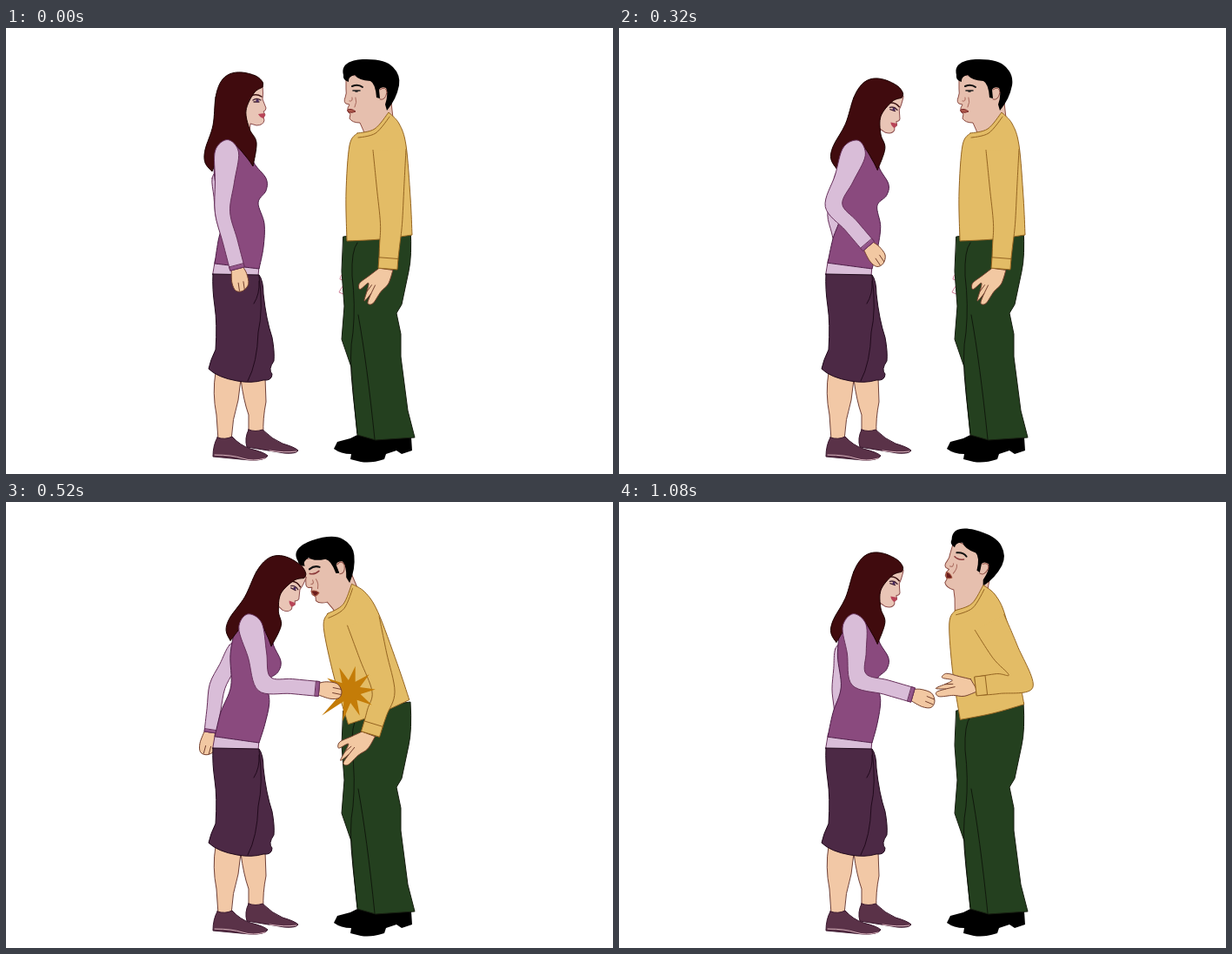
Write an HTML page that moves like this. It is 698 px wide and 513 px high and loops after 1.2 s.

```html
<!DOCTYPE html>
<html lang="en">
<head>
<meta charset="utf-8">
<style>
html, body { margin: 0; width: 100%; height: 100%; overflow: hidden; background: #fff; }
svg { display: block; width: 100vw; height: 100vh; }
path { stroke-linejoin: round; stroke-linecap: round; }
</style>
</head>
<body>
<svg viewBox="0 0 698 513" fill="none">
  <path fill="#000" d="M377,484L381,476 396,472 404,468 466,471 467,486 455,490 449,486 437,490 435,496Q420,501 408,499L396,496 397,490Q385,490 377,484Z"/>
  <path id="fingertips" stroke="#d08098" d="M388,282Q384,285 384,289L388,290M388,296Q384,301 383,304L388,306"/>
  <path fill="#24401f" stroke="#161d10" d="M388,240L465,230Q467,262 463,280L455,318 449,328 454,352 454,378 462,440 470,471 425,474 404,468Q400,430 397,390L386,358 389,320 386,280Z"/>
  <path stroke="#10180c" d="M404,247Q397,256 398,285 402,318 399,350 394,375 399,420L404,466M405,330Q415,385 424,473"/>
  <g id="manHead">
    <path fill="#e6bfae" stroke="#8c4c43" d="M391,54L391,70Q392,75 390,80 388,85 391,87L395,88 393,92 393,96 396,99 395,104Q398,109 407,109L411,118 416,134 446,112 440,60Z"/>
    <path fill="#000" d="M388,54C385,42 395,37 410,36Q436,35 445,45 454,54 452,66 449,82 438,95L436,88Q440,76 437,69 431,67 429,71L430,81 426,80Q425,64 419,61 405,60 401,54 393,56 394,62 387,60 388,54Z"/>
    <path fill="#e6bfae" stroke="#8c4c43" d="M430,71Q437,66 438,74 436,84 430,82"/>
    <path stroke="#a8685c" d="M402,80Q404,85 401,91M395,84Q399,85 398,80"/>
    <path stroke="#111" stroke-width="2" d="M398,67Q405,64 410,68"/>
    <path id="openEye" stroke="#222" stroke-width="1.6" d="M399,72L407,72M402,73L404,73"/>
    <path id="shutEye" stroke="#8c3b3b" stroke-width="1.6" d="M397,72Q402,75 408,72"/>
    <path id="calmMouth" fill="#b05a4c" stroke="#7a2828" d="M393,94Q397,92 402,96 398,98 394,97Z"/>
    <path id="openMouth" fill="#6a1c1c" stroke="#a0503c" d="M393,92Q397,91 401,96 397,99 395,98Z"/>
  </g>
  <g id="man"></g>
  <path id="star" fill="#c47c08"/>
  <g id="farArm"></g>
  <g stroke="#6e4038">
    <path fill="#f2c8a6" d="M241,396Q237,420 242,445L244,474H259Q260,450 267,428L270,404ZM270,404Q273,428 279,445L279,467H296Q295,450 299,430L298,402Z"/>
    <g fill="#5a3248" stroke="#38162c">
      <path d="M279,462Q287,465 295,462 306,473 318,478 332,482 336,486 334,490 320,489L277,482Q274,472 279,462Z"/>
      <path d="M243,471Q252,474 260,470 269,480 281,484 297,488 301,492 298,498 280,497L238,493Q238,480 243,471Z"/>
      <path stroke="#d9b4bd" d="M240,491Q260,491 272,495T298,495M303,486Q320,489 334,487"/>
    </g>
    <path fill="#d9bdd8" stroke="#66305a" d="M241,266L291,274 290,285 238,284Z"/>
    <path fill="#4c2945" stroke="#210a1c" d="M238,283L291,284Q296,291 296,306 299,335 306,356 309,372 308,383 301,393 306,398 306,406 296,405 283,409 266,406 243,402 233,392 235,382 241,370 243,340 240,320 237,300 238,283Z"/>
    <path stroke="#210a1c" d="M291,285Q296,325 290,350 289,385 278,406M291,291Q292,306 285,317"/>
  </g>
  <g id="womanHead">
    <path fill="#e9c5b6" stroke="#8c4c4c" d="M277,68L295,66Q296,76 295,82L299,92Q299,95 296,96L298,100 296,103 297,106Q296,112 288,112L281,110 279,130 264,130 274,90Z"/>
    <path stroke="#3a1010" stroke-width="1.5" d="M282,78Q288,75 294,79"/>
    <path stroke="#402030" stroke-width="1.3" d="M284,83Q288,80 293,83M285,85L291,85"/>
    <circle cx="289" cy="83.5" r="1.6" fill="#4a2a60"/>
    <path fill="#b84458" d="M290,99L297,98 298,100 296,104Q292,103 290,99Z"/>
  </g>
  <g id="woman"></g>
</svg>
<script>
const $ = id => document.getElementById(id);
const parse = text => text.split(' ').map(pair => pair.split(',').map(Number));
const mix = (a, b, k) => a + (b - a) * k;
const middle = (a, b) => [mix(a[0], b[0], .5), mix(a[1], b[1], .5)];
const unit = ([x, y]) => [x / Math.hypot(x, y), y / Math.hypot(x, y)];
const toward = (a, b) => unit([b[0] - a[0], b[1] - a[1]]);
// Point reached by going along direction d and sideways from it.
const step = (p, d, along, side) => [p[0] + d[0] * along - d[1] * side, p[1] + d[1] * along + d[0] * side];

// How each upper body bends above the waist as the figure leans.
const woman = {
  axis: 270, waist: 272, height: 150, power: 1.4, sag: .19,
  head: [288, 83], shoulder: [254, 142], farShoulder: [246, 172], arm: [13.5, 8.5, 8.5],
  torso: parse('254,118 275,130 285,155 299,173 299,187 290,201 297,225 296,252 291,277 240,271 244,245 250,215 241,180 239,150 243,132'),
  hair: parse('241,80 247,62 257,53 271,51 287,55 295,62 295,68 285,75 276,95 280,116 288,132 284,159 276,148 262,134 248,140 237,165 229,155 229,140 238,112')
};
const man = {
  axis: 430, waist: 244, height: 140, power: 1, sag: 0,
  head: [432, 100], shoulder: [441, 140], arm: [19, 12.5, 10.5],
  torso: parse('404,121 424,116 440,97 452,110 460,135 465,195 467,238 430,243 392,245 391,190 395,135')
};

// Local hand outlines: x runs on from the wrist.
const fist = parse('0,-7 8,-9 20,-8 26,0 24,8 14,10 0,7');
const fistLines = ['16,-3 25,-2', '16,3 25,4'].map(parse);
const openHand = parse('0,10 1,-6 17,-2 27,6 41,14 41,20 30,17 39,24 28,22 18,21 26,30 19,31 9,20');
const openLines = ['20,13 30,17', '20,17 28,22'].map(parse);

const womanStand = { lean: 0, nod: 0, elbow: [249, 212], wrist: [266, 277], farElbow: [250, 215], farWrist: [258, 250] };
const womanLean = { lean: 20, nod: 6, elbow: [247, 204], wrist: [287, 251], farElbow: [249, 215], farWrist: [256, 254] };
const womanDraw = { lean: 32, nod: 9, elbow: [283, 203], wrist: [332, 231], farElbow: [243, 212], farWrist: [235, 265] };
const womanPunch = { ...womanDraw, elbow: [297, 209], wrist: [360, 215] };
const womanBack = { ...womanLean, elbow: [276, 204], wrist: [338, 222], farElbow: [254, 215] };
const womanKeys = [[0, womanStand], [240, womanStand], [320, womanLean], [400, womanDraw], [480, womanPunch], [520, womanPunch], [560, womanBack]];

const manStand = { lean: 0, nod: 0, twist: 0, elbow: [443, 225], wrist: [439, 277] };
const manLean = { lean: -25, nod: 0, twist: -10, elbow: [437, 220], wrist: [440, 275] };
const manHit = { lean: -40, nod: 0, twist: 0, elbow: [434, 218], wrist: [419, 267] };
const manBack = { lean: -20, nod: 25, twist: -28, elbow: [462, 206], wrist: [410, 212] };
const manKeys = [[0, manStand], [320, manStand], [400, manLean], [500, manHit], [560, manHit], [640, manBack]];

function poseAt(keys, t) {
  const next = keys.findIndex(([time]) => time > t);
  if (next < 0) return keys[keys.length - 1][1];
  const [[start, from], [end, to]] = [keys[next - 1], keys[next]];
  const k = (t - start) / (end - start);
  const blend = (a, b) => Array.isArray(a) ? a.map((v, i) => mix(v, b[i], k)) : mix(a, b, k);
  return Object.fromEntries(Object.keys(from).map(key => [key, blend(from[key], to[key])]));
}

function bend(body, lean, [x, y]) {
  const h = Math.max(0, (body.waist - y) / body.height);
  const angle = body.power * lean * h ** (body.power - 1) / body.height;
  const across = x - body.axis;
  const point = [
    body.axis + lean * h ** body.power + across * Math.cos(angle),
    y + body.sag * lean * h * h + across * Math.sin(angle)
  ];
  return { point, angle };
}
const bendAll = (body, lean, pts) => pts.map(p => bend(body, lean, p).point);

// Smooth line through the points, breaking sharply at the corners.
function curve(pts, corners = [], open = false) {
  const n = pts.length;
  const handle = (i, side) => {
    const p = pts[i];
    if (open && (i === 0 || i === n - 1)) return p;
    const sharp = corners.includes(i);
    const a = sharp && side > 0 ? p : pts[(i + n - 1) % n];
    const b = sharp && side < 0 ? p : pts[(i + 1) % n];
    return [p[0] + side * (b[0] - a[0]) / 6, p[1] + side * (b[1] - a[1]) / 6];
  };
  let d = 'M' + pts[0];
  for (let i = 0; i < (open ? n - 1 : n); i++) {
    const j = (i + 1) % n;
    d += `C${handle(i, 1)} ${handle(j, -1)} ${pts[j]}`;
  }
  return open ? d : d + 'Z';
}

// Tapered sleeve: sides run down to the wrist and back up.
function sleeve(shoulder, elbow, wrist, [top, mid, end], open) {
  const upper = toward(shoulder, elbow), fore = toward(elbow, wrist);
  const turn = unit([upper[0] + fore[0], upper[1] + fore[1]]);
  const miter = Math.max(.8, turn[0] * upper[0] + turn[1] * upper[1]);
  const stations = [
    [shoulder, upper, top], [middle(shoulder, elbow), upper, (top + mid) / 2],
    [elbow, turn, mid / miter], [middle(elbow, wrist), fore, (mid + end) / 2], [wrist, fore, end]
  ];
  const edge = sign => stations.map(([p, d, r]) => step(p, d, 0, sign * r));
  const outline = [...edge(1), ...edge(-1).reverse()];
  if (!open) outline.push(step(shoulder, upper, -top, 0));
  return curve(outline, [4, 5], open);
}

function cuff(elbow, wrist, length, half) {
  const d = toward(elbow, wrist);
  const ends = [[-length, half], [0, half], [0, -half], [-length, -half]];
  return 'M' + ends.map(([along, side]) => step(wrist, d, along, side)).join('L') + 'Z';
}

function hand(shape, lines, elbow, wrist, twist, corners) {
  const d = toward(elbow, wrist), angle = Math.atan2(d[1], d[0]) + twist * Math.PI / 180;
  const dir = [Math.cos(angle), Math.sin(angle)];
  const place = pts => pts.map(([x, y]) => step(wrist, dir, x, y));
  return curve(place(shape), corners) + lines.map(line => 'M' + place(line).join('L')).join('');
}

function addPath(parent, fill, stroke) {
  const el = document.createElementNS('http://www.w3.org/2000/svg', 'path');
  el.setAttribute('fill', fill);
  el.setAttribute('stroke', stroke);
  $(parent).append(el);
  return d => el.setAttribute('d', d);
}

const plum = '#66305a', lilac = '#d9bdd8', band = '#93558a', skin = '#f2c8a2', skinLine = '#74402e';
const ochre = '#e3bc66', brown = '#946422';
const paint = {
  farHand: addPath('farArm', skin, skinLine),
  farArm: addPath('farArm', lilac, plum),
  farCuff: addPath('farArm', band, plum),
  vest: addPath('woman', '#8a4a7e', '#4c1c46'),
  hair: addPath('woman', '#400b0e', '#1c0000'),
  fist: addPath('woman', skin, skinLine),
  womanArm: addPath('woman', lilac, plum),
  womanCuff: addPath('woman', band, plum),
  sweater: addPath('man', ochre, brown),
  collar: addPath('man', 'none', brown),
  manHand: addPath('man', skin, skinLine),
  manArm: addPath('man', ochre, brown),
  manCuff: addPath('man', ochre, brown)
};

function placeHead(id, body, { lean, nod }) {
  const { point, angle } = bend(body, lean, body.head);
  const [x, y] = body.head;
  $(id).setAttribute('transform',
    `translate(${point}) rotate(${angle * 180 / Math.PI + nod}) translate(${-x} ${-y})`);
}

function drawWoman(t) {
  const p = poseAt(womanKeys, t);
  const at = joint => bend(woman, p.lean, woman[joint]).point;
  placeHead('womanHead', woman, p);
  paint.vest(curve(bendAll(woman, p.lean, woman.torso), [0, 8, 9]));
  paint.hair(curve(bendAll(woman, p.lean, woman.hair), [6, 11, 15]));
  paint.farHand(hand(fist, fistLines, p.farElbow, p.farWrist, 0, [0, 6]));
  paint.farArm(sleeve(at('farShoulder'), p.farElbow, p.farWrist, [9, 9, 7]));
  paint.farCuff(cuff(p.farElbow, p.farWrist, 3, 7));
  paint.fist(hand(fist, fistLines, p.elbow, p.wrist, 0, [0, 6]));
  paint.womanArm(sleeve(at('shoulder'), p.elbow, p.wrist, woman.arm));
  paint.womanCuff(cuff(p.elbow, p.wrist, 4, 8.5));
}

function drawMan(t) {
  const p = poseAt(manKeys, t);
  const torso = bendAll(man, p.lean, man.torso);
  placeHead('manHead', man, p);
  paint.sweater(curve(torso, [0, 2, 6, 8]));
  paint.collar(curve(torso.slice(0, 3).map(([x, y]) => [x + 1, y + 5]), [], true));
  paint.manHand(hand(openHand, openLines, p.elbow, p.wrist, p.twist, [0, 1, 6, 8]));
  paint.manArm(sleeve(bend(man, p.lean, man.shoulder).point, p.elbow, p.wrist, man.arm, true));
  paint.manCuff(cuff(p.elbow, p.wrist, 12, 11));
}

function starPath() {
  const spikes = 10, longest = 139 * Math.PI / 180;
  const pts = Array.from({ length: spikes * 2 }, (_, i) => {
    const a = longest + i * Math.PI / spikes;
    const r = i % 2 ? 13 : 30 + 12 * Math.max(0, Math.cos(a - longest)) ** 4;
    return [395 + r * Math.cos(a), 218 + r * Math.sin(a)];
  });
  return 'M' + pts.join('L') + 'Z';
}
$('star').setAttribute('d', starPath());

const show = (id, on) => $(id).setAttribute('visibility', on ? 'visible' : 'hidden');

function draw(time) {
  const t = Math.min(1080, Math.floor(time % 1200 / 40) * 40);
  const hurt = t >= 480;
  drawMan(t);
  drawWoman(t);
  show('fingertips', t < 360);
  show('openEye', !hurt);
  show('shutEye', hurt);
  show('calmMouth', !hurt);
  show('openMouth', hurt);
  show('star', hurt && t < 560);
}

const begin = performance.now();
function tick() {
  draw(performance.now() - begin);
  requestAnimationFrame(tick);
}
tick();
</script>
</body>
</html>
```
